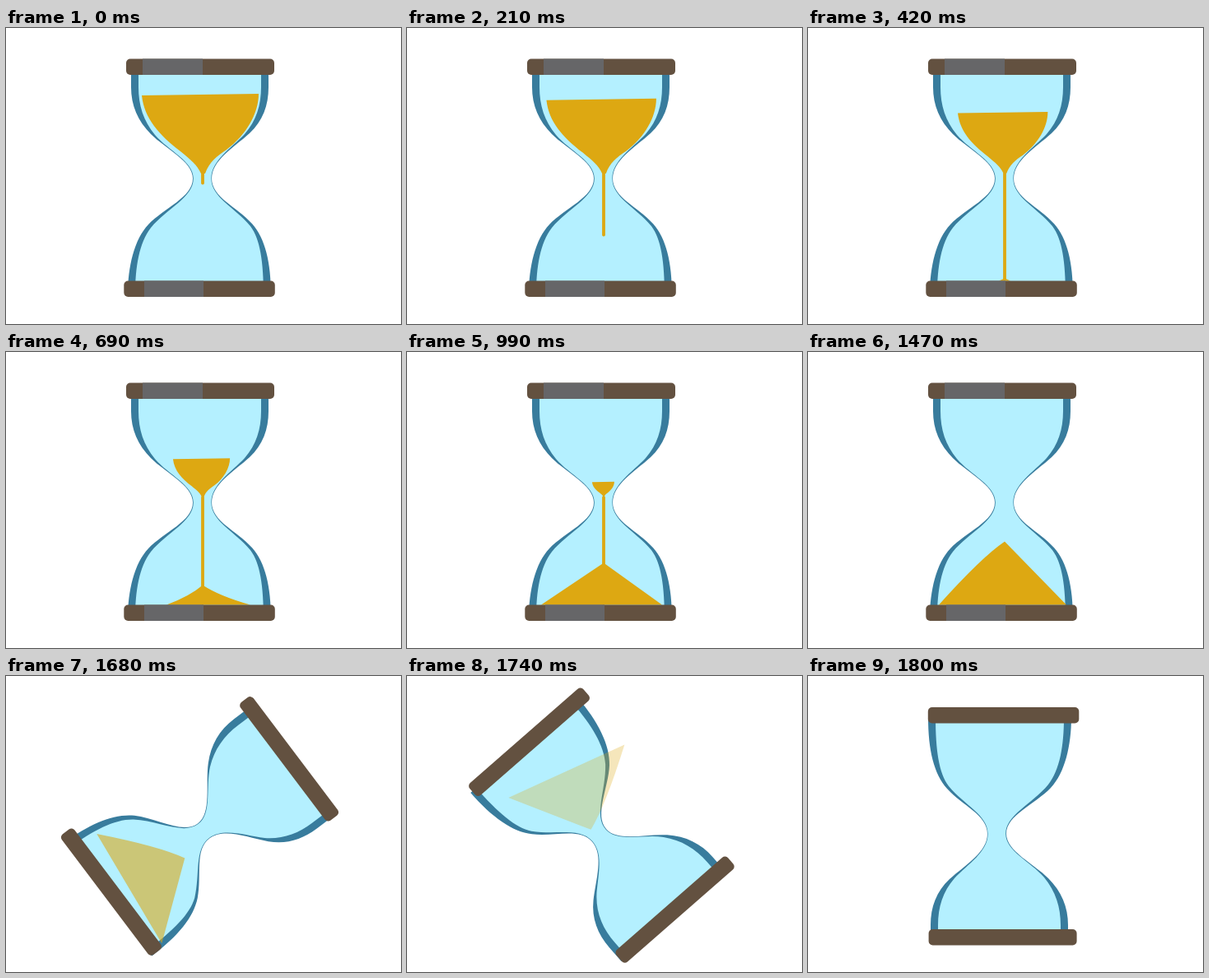
Recreate the animation shown at these times as an HTML page with a canvas. Size 480 px wide and 360 px high, loop 1.83 s.

```html
<!DOCTYPE html>
<html lang="en">
<head>
<meta charset="utf-8">
<title>Hourglass</title>
<style>
html, body { margin: 0; width: 100%; height: 100%; overflow: hidden; background: #fff; }
canvas { display: block; }
</style>
</head>
<body>
<canvas id="stage" width="480" height="360"></canvas>
<script>
const ctx = document.getElementById('stage').getContext('2d');
const LOOP = 1830, STEP = 30, FLIP = 1611, FLIP_END = 1800;
const WOOD = '#635140', GREY = '#666668', RIM = '#387c9d', GLASS = '#b4f0ff', SAND = '#dda812';
const NECK = { x: 239, y: 176 }, FLOOR = 307.5;

const outer = new Path2D(`M152 50V72C152 94 160 113 176 129C194 147 227 162 227 183
  C227 206 192 219 173 239C156 257 148 290 148 325H322C322 285 315 256 299 238
  C280 217 250 206 250 183C250 161 276 146 296 128C312 113 319 94 319 72V50Z`);
const inner = new Path2D(`M161 50V72C161 94 167 113 181 130C197 149 227.8 162 227.8 183
  C227.8 206 196 219 176 243C162 261 157 290 157 325H313C313 285 309 257 297 241
  C278 218 249.4 206 249.4 183C249.4 161 274 146 290 129C304 113 310 94 310 72V50Z`);
// Full upper sand, measured from the neck
const upper = new Path2D(`M-74 -94L68 -96C68 -72 53 -46 29 -28C17 -20 8 -13 3 1H-2
  C-7 -10 -14 -15 -27 -26C-53 -46 -71 -66 -74 -94Z`);

// Piecewise linear value through [time, value] points
function along(t, points) {
  let [t0, v0] = points[0];
  if (t <= t0) return v0;
  for (const [t1, v1] of points) {
    if (t < t1) return v0 + (v1 - v0) * (t - t0) / (t1 - t0);
    [t0, v0] = [t1, v1];
  }
  return v0;
}

function spun(x, y, angle, draw) {
  ctx.save();
  ctx.translate(x, y);
  ctx.rotate(angle);
  ctx.translate(-x, -y);
  draw();
  ctx.restore();
}

function fill(color, path) {
  ctx.fillStyle = color;
  ctx.fill(path);
}

function cap(x, y, w, greyX, greyEnd, plain) {
  const bar = new Path2D();
  bar.roundRect(x, y, w, 19.5, 5);
  fill(WOOD, bar);
  if (!plain) {
    ctx.fillStyle = GREY;
    ctx.fillRect(greyX, y, greyEnd - greyX, 19.5);
  }
}

function pile(t) {
  const h = along(t, [[390, 0], [420, 3], [690, 24], [990, 51], [1230, 67], [1470, 77]]);
  if (h <= 0) return;
  const left = along(t, [[390, 3], [420, 7], [690, 44], [990, 76], [1470, 80]]);
  const right = along(t, [[390, 3], [420, 7], [690, 58], [990, 71], [1470, 75]]);
  const bend = along(t, [[420, 0], [690, 5], [990, 0], [1470, -8]]);
  const top = FLOOR - h, shape = new Path2D();
  shape.moveTo(NECK.x - left, FLOOR);
  shape.quadraticCurveTo(NECK.x - left * .35, top + h * .35 + bend, NECK.x, top);
  shape.quadraticCurveTo(NECK.x + right * .35, top + h * .35 + Math.max(0, bend), NECK.x + right, FLOOR);
  shape.closePath();
  fill(SAND, shape);
}

function fallingSand(t) {
  const size = along(t, [[0, 1], [210, .94], [420, .77], [690, .487], [990, .19], [1180, 0]]);
  if (size > 0) {
    ctx.save();
    ctx.translate(NECK.x, NECK.y);
    ctx.scale(size, size);
    fill(SAND, upper);
    ctx.restore();
  }
  const tail = along(t, [[1150, NECK.y - 1], [1470, 232]]);
  const tip = along(t, [[0, 190.5], [390, FLOOR]]);
  if (t < 1470) {
    const stream = new Path2D();
    stream.roundRect(NECK.x - 1.9, tail, 3.8, tip - tail, 1.8);
    fill(SAND, stream);
  }
}

function draw(t) {
  const flipping = t > FLIP;
  const p = Math.max(0, (t - FLIP) / (FLIP_END - FLIP));
  const angle = Math.PI * (1 - Math.cos(Math.PI * p)) / 2;

  ctx.fillStyle = '#fff';
  ctx.fillRect(0, 0, 480, 360);
  spun(234, 187.5, angle, () => {
    fill(RIM, outer);
    fill(GLASS, inner);
  });
  if (!flipping) fallingSand(t);
  ctx.globalAlpha = along(t, [[1590, 1], [FLIP_END, 0]]);
  spun(236, 207, angle * 1.12, () => pile(t));
  ctx.globalAlpha = 1;
  spun(236.3, 182.5, angle, () => {
    cap(146, 37.5, 180, 166, 239, flipping);
    cap(143.3, 307.5, 183.5, 168, 240, flipping);
  });
}

const start = performance.now();
function tick() {
  const t = (performance.now() - start) % LOOP;
  draw(Math.floor(t / STEP) * STEP);
  requestAnimationFrame(tick);
}
tick();
</script>
</body>
</html>
```
